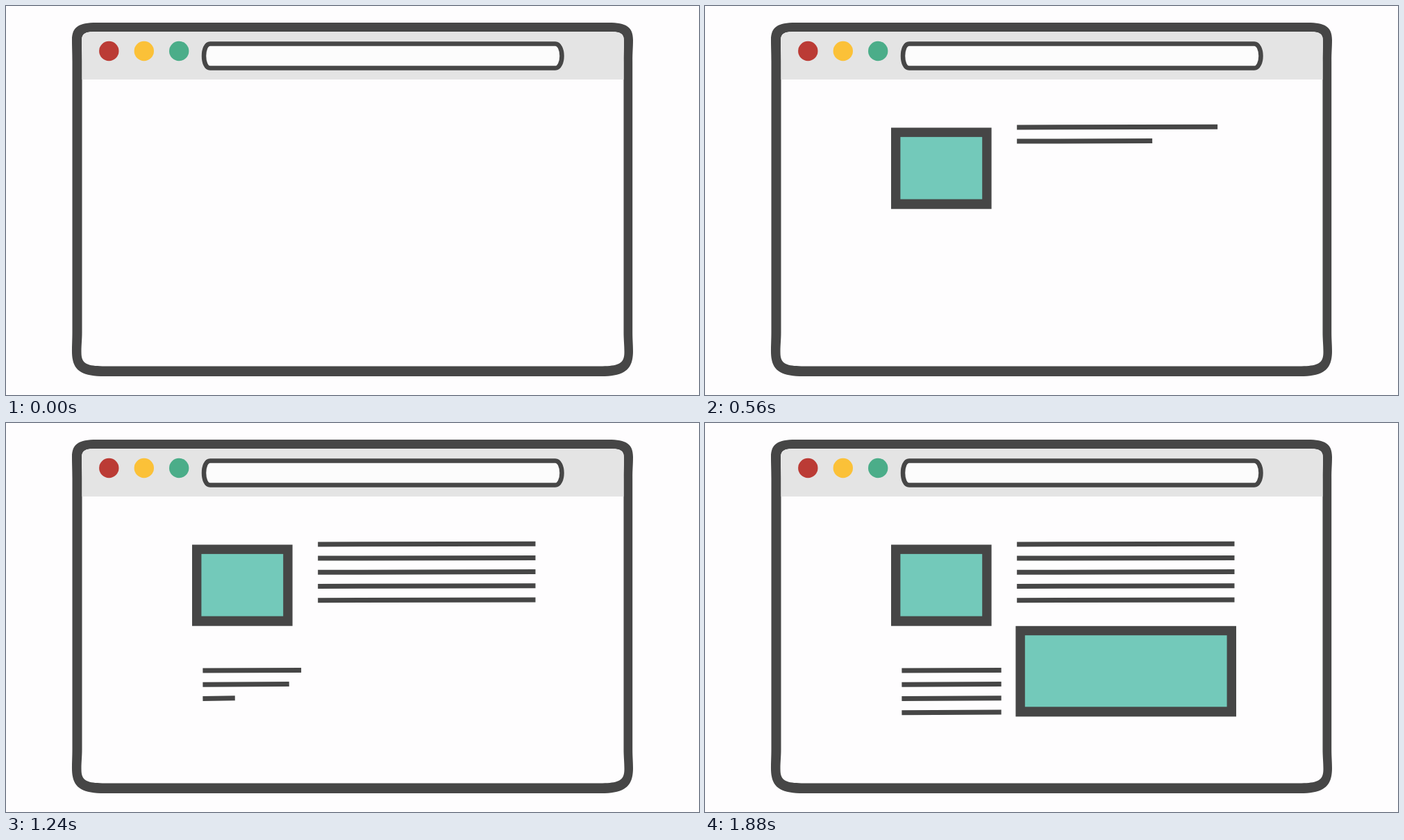
An HTML page that plays this animation: 998x561 px, repeating every 2040 ms.

```html
<!DOCTYPE html>
<html lang="en">
<head>
<meta charset="utf-8">
<title>Page layout</title>
<style>
html, body { margin: 0; width: 100%; height: 100%; overflow: hidden; background: #fefdfe; }
svg { display: block; width: 100vw; height: 100vh; }
</style>
</head>
<body>
<svg viewBox="0 0 998 561" preserveAspectRatio="none">
  <rect width="998" height="561" fill="#fefdfe"/>
  <path fill="#464646" d="M130 24H868C893 24 903 30 903 49C903 60 902.2 66 902.2 80V470C902.2 482 903 488 903 498C903 524 891 534 857 534H142C106 534 95 524 95 498C95 488 95.5 482 95.5 470V80C95.5 66 95 60 95 49C95 30 105 24 130 24Z"/>
  <clipPath id="inside">
    <path d="M129 37H869C886 37 890 40 890 51C890 60 889.5 66 889.5 80V470C889.5 482 890.5 488 890.5 499C890.5 515 884 519.5 855 519.5H143C114 519.5 108.5 515 108.5 499C108.5 488 109.5 482 109.5 470V80C109.5 66 109 60 109 51C109 40 113 37 129 37Z"/>
  </clipPath>
  <g clip-path="url(#inside)">
    <rect x="100" y="30" width="800" height="500" fill="#fefdfe"/>
    <rect x="100" y="30" width="800" height="76" fill="#e4e4e4"/>
  </g>
  <circle cx="148.3" cy="65" r="14.2" fill="#bb3b35"/>
  <circle cx="198.8" cy="65" r="14.2" fill="#fbc138"/>
  <circle cx="249.2" cy="65" r="14.2" fill="#4bad89"/>
  <path fill="#fcfcfc" stroke="#464646" stroke-width="6.5" d="M294 54.4H791C797 54.4 800.5 63 800.5 72S797 89.6 791 89.6H294C288 89.6 285 81 285 72S288 54.4 294 54.4Z"/>
  <g id="content"></g>
</svg>
<script>
const LOOP = 2040, STEP = 40, LAST = 1880;
const STAGGER = 120;
const content = document.getElementById("content");

function add(tag, attrs, parent = content) {
  const node = document.createElementNS("http://www.w3.org/2000/svg", tag);
  for (const key in attrs) node.setAttribute(key, attrs[key]);
  return parent.appendChild(node);
}

// Logistic rise with a quick attack and a soft landing
function ease(elapsed, middle, spread) {
  if (elapsed < 0) return 0;
  return 1 / (1 + Math.exp(-1.88 - Math.sinh((elapsed - middle) / spread)));
}

function show(node, visible) {
  node.setAttribute("visibility", visible ? "visible" : "hidden");
}

function makeBox(start, x, y, width, height) {
  const border = 13.4;
  const cx = x + width / 2, cy = y + height / 2;
  const group = add("g", {});
  add("rect", { x, y, width, height, fill: "#464646" }, group);
  add("rect", {
    x: x + border, y: y + border,
    width: width - 2 * border, height: height - 2 * border - .7,
    fill: "#73c9ba"
  }, group);
  return time => {
    const scale = ease(time - start, 200, 80);
    show(group, scale);
    group.setAttribute("transform", `translate(${cx} ${cy}) scale(${scale}) translate(${-cx} ${-cy})`);
  };
}

function makeLine(start, x, y, length) {
  const line = add("line", { x1: x, y1: y, y2: y - .7, stroke: "#464646", "stroke-width": 7 });
  return time => {
    const drawn = ease(time - start, 160, 71);
    show(line, drawn);
    line.setAttribute("x2", x + length * drawn);
  };
}

function makeParagraph(count, start, x, y, length) {
  return Array.from({ length: count }, (_, i) =>
    makeLine(start + STAGGER * i, x, y + 20.2 * i, length));
}

const parts = [
  makeBox(40, 268, 175.5, 144.6, 117.2),
  makeBox(1400, 447.4, 292.8, 317.6, 130.6),
  ...makeParagraph(5, 360, 449.2, 174.9, 313.3),
  ...makeParagraph(4, 960, 283.4, 357.1, 143.3)
];

function render(now) {
  const time = Math.min(Math.floor((now % LOOP) / STEP) * STEP, LAST);
  parts.forEach(update => update(time));
}

const begin = performance.now();
function tick() {
  render(performance.now() - begin);
  requestAnimationFrame(tick);
}
tick();
</script>
</body>
</html>
```
